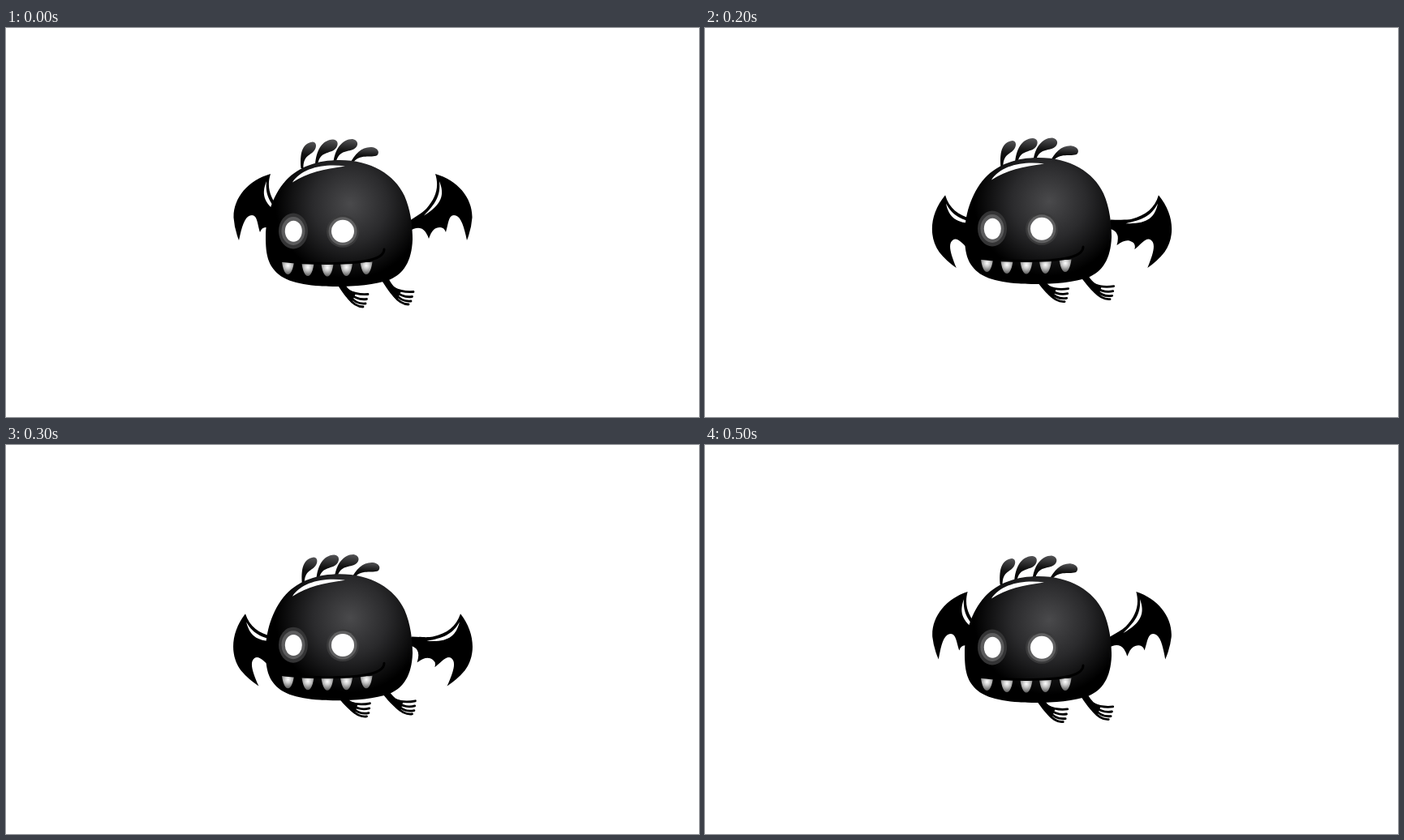
An HTML page that plays this animation: 854 by 480 pixels, repeating every 600 ms.

```html
<!DOCTYPE html>
<html lang="en">
<head>
<meta charset="utf-8">
<title>Bat creature</title>
<style>
  html, body { margin: 0; width: 100%; height: 100%; overflow: hidden; background: #fff; }

  /* One pose per key; the children read the inherited values. */
  svg {
    display: block;
    width: 100vw;
    height: 100vh;
    animation: fly 600ms step-end infinite;
  }
  .body { transform: translateY(var(--lift)); }
  .hair { transform: translate(var(--sway), var(--rise)); }
  .wing { transform-origin: 501px 242px; transform: rotate(var(--flap)); }
  .foot { transform-origin: -8px -8px; transform: translateY(var(--lift)) rotate(var(--kick)); }
  .floor { transform: translateY(var(--floor)); }

  @keyframes fly {
    0%, 100% {
      --lift: 0px; --sway: 0px; --rise: 0px; --flap: 0deg; --kick: 0deg; --floor: 0px;
    }
    16.66%, 83.33% {
      --lift: -1px; --sway: .2px; --rise: -.6px; --flap: 2.2deg; --kick: -2deg; --floor: -3px;
    }
    33.33%, 66.66% {
      --lift: -3px; --sway: 1px; --rise: -1.6px; --flap: 34.1deg; --kick: -5deg; --floor: -6px;
    }
    50% {
      --lift: -3.8px; --sway: 1.4px; --rise: -2px; --flap: 35.9deg; --kick: -7.5deg; --floor: -6px;
    }
  }
</style>
</head>
<body>
<svg viewBox="0 0 854 480">
  <defs>
    <radialGradient id="skin" gradientUnits="userSpaceOnUse" cx="424" cy="217" r="92">
      <stop offset="0" stop-color="#4a4a4c"/>
      <stop offset=".5" stop-color="#2a2a2c"/>
      <stop offset="1" stop-color="#000"/>
    </radialGradient>
    <linearGradient id="strand" x1=".4" y1="0" x2=".3" y2="1">
      <stop offset="0" stop-color="#505052"/>
      <stop offset=".5" stop-color="#111"/>
      <stop offset="1" stop-color="#000"/>
    </linearGradient>
    <radialGradient id="enamel" cx=".5" cy=".3" r=".65">
      <stop offset="0" stop-color="#fff"/>
      <stop offset=".4" stop-color="#ccc"/>
      <stop offset="1" stop-color="#666"/>
    </radialGradient>
    <clipPath id="ground">
      <rect class="floor" x="380" y="280" width="90" height="66"/>
    </clipPath>

    <g id="wing">
      <g class="wing">
        <path d="M529 180 C557 188 575 210 574.500 234 Q573.500 248 568 262
                 C564 243 560 231 552 231 C545 231 545 243 542 252
                 Q540 246 535 246 C527 246 524 252 521 260
                 Q517 248 510 247 Q504 246 497 251 L497 238
                 C508 231 514 227 518 223 C530 209 534 196 529 180Z"/>
        <path fill="#fff" d="M534 189 C541 206 537 218 515 231.500 C529 217 536 207 534 189Z"/>
      </g>
    </g>

    <g id="foot">
      <g class="foot">
        <path d="M-5 -4 L5 -4 C9 5 14 10 21 12.500 L16 24 C9 18 2 8 -5 -4Z"/>
        <path fill="none" stroke="#000" stroke-width="2.800" stroke-linecap="round"
              d="M12 9 Q22 14.500 36 13.500 M14 13 Q23 21 34.500 19.500 M14 16 Q21 26 33 25 M12 18 Q20 29 30 29"/>
      </g>
    </g>

    <path id="tooth" fill="url(#enamel)" d="M-7.500 0 Q0 1 7.500 0 C6.500 8 4 15.500 0 15.500 C-4 15.500 -6.500 8 -7.500 0Z"/>
  </defs>

  <use href="#wing"/>
  <use href="#wing" transform="translate(855 0) scale(-1 1)"/>

  <use href="#foot" x="466" y="312"/>
  <g clip-path="url(#ground)">
    <use href="#foot" x="410" y="315"/>
  </g>

  <g class="hair" fill="url(#strand)">
    <path d="M363.500 173 C362 157 364 142 378 140.500 C383 141 383 147 380 151 C376 157 366 157 366.500 173Z"/>
    <path d="M381 169 C382 152 389 138 403 137.500 C410 138 410 145 406 149 C399 156 387 151 384 169Z"/>
    <path d="M403.500 166 C405 150 414 137 427 137 C434 138 435 145 430 148.500 C422 154 411 149 406.500 166Z"/>
    <path d="M424 167 C430 155 439 146 451 147 C458 148 461 153 457.500 157 C450 161 436 154 427 167Z"/>
  </g>

  <g class="body">
    <path fill="url(#skin)"
          d="M411 163 C450 163 479 181 491 207 C499 225 501 246 501 261
             C500 288 490 303 473 310.500 C455 317 430 319 408 319
             C380 319 350 316 336 304 C323 293 320 280 320 258
             C320 236 327 208 345 188 C361 171 384 163 411 163Z"/>
    <path fill="#fff" d="M353 190.500 C364 173 391 167 418 170.500 C391 174.500 372 178 353 190.500Z"/>

    <ellipse cx="354" cy="250.500" rx="18" ry="22" fill="#343435"/>
    <ellipse cx="354" cy="250.500" rx="14.500" ry="17.500" fill="#5c5c5d"/>
    <ellipse cx="354.300" cy="250.800" rx="10.500" ry="13" fill="#fff"/>

    <circle cx="415" cy="250.800" r="20" fill="#3a3a3b"/>
    <circle cx="415" cy="250.800" r="17.500" fill="#606061"/>
    <circle cx="415" cy="250.800" r="14" fill="#fff"/>

    <use href="#tooth" x="347.500" y="288.500"/>
    <use href="#tooth" x="372" y="290.500"/>
    <use href="#tooth" x="396" y="291"/>
    <use href="#tooth" x="419.500" y="290.500"/>
    <use href="#tooth" x="444" y="288.500"/>
    <path fill="none" stroke="#000" stroke-width="3" stroke-linecap="round"
          d="M337 287 Q364 290.500 396 290.500 C425 290.500 466 289 466 273"/>
  </g>
</svg>
</body>
</html>
```
